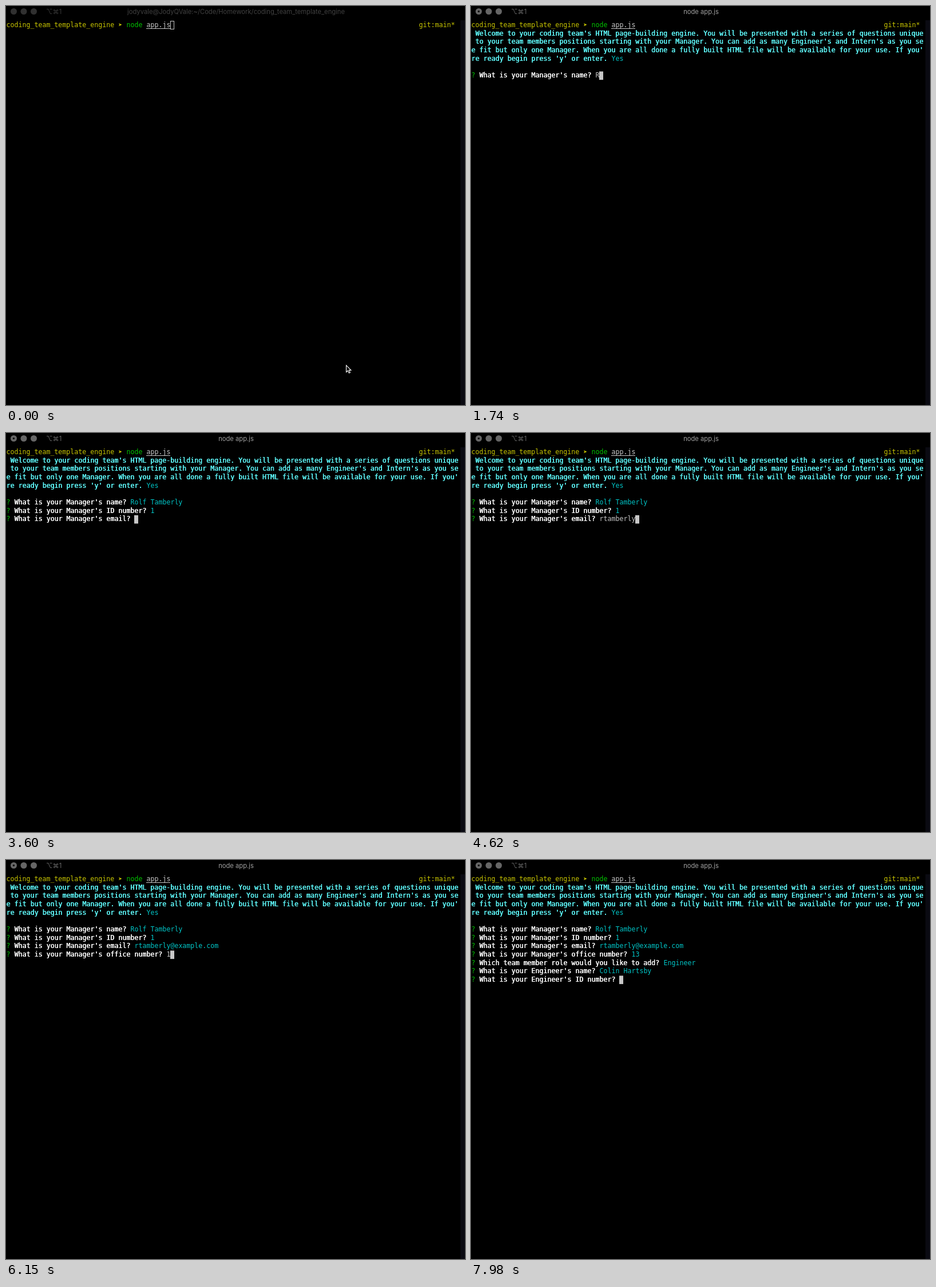
Write an HTML page with a canvas that moves like this. It is 802 px wide and 698 px high and loops after 8000 ms.

```html
<!DOCTYPE html>
<html lang="en">
<head>
<meta charset="utf-8">
<title>Terminal session</title>
<style>
  html, body { margin: 0; width: 100%; height: 100%; overflow: hidden; background: #000; }
  canvas { display: block; }
</style>
</head>
<body>
<canvas id="stage" width="802" height="698"></canvas>
<script>
const ctx = document.getElementById('stage').getContext('2d');
const LOOP = 8000, CELL = 7, LINE = 14.65, TOP = 26.6;
const MONO = '11.627px "DejaVu Sans Mono", monospace';
const SANS = '11.2px Inter, sans-serif';
const C = {
  green: '#00c200', yellow: '#c7c400', cyan: '#00c5c7', sky: '#60fdff',
  gray: '#c7c7c7', dim: '#686868', white: '#ffffff'
};

// Session events in ms
const FOCUS = 300, RUN = 600, WELCOME = 850, CONFIRM = 1350;

const INTRO = [
  " Welcome to your coding team's HTML page-building engine. You will be presented with a series of questions unique",
  " to your team members positions starting with your Manager. You can add as many Engineer's and Intern's as you se",
  "e fit but only one Manager. When you are all done a fully built HTML file will be available for your use. If you'",
  "re ready begin press 'y' or enter. "
];

// ask: question appears, type: first key, rate: ms per key, done: enter pressed
const QUESTIONS = [
  { text: "What is your Manager's name?", answer: 'Rolf Tamberly', ask: CONFIRM, type: 1710, rate: 108, done: 3100 },
  { text: "What is your Manager's ID number?", answer: '1', ask: 3100, type: 3210, rate: 100, done: 3330 },
  { text: "What is your Manager's email?", answer: 'rtamberly@example.com', ask: 3330, type: 3800, rate: 95, done: 5800 },
  { text: "What is your Manager's office number?", answer: '13', ask: 5800, type: 6060, rate: 130, done: 6360 },
  { text: 'Which team member role would you like to add?', answer: 'Engineer', ask: 6360, done: 6780,
    choices: ['Engineer', 'Intern', 'None'] },
  { text: "What is your Engineer's name?", answer: 'Colin Hartsby', ask: 6780, type: 6870, rate: 70, done: 7860 },
  { text: "What is your Engineer's ID number?", answer: '', ask: 7860, type: LOOP, rate: 100, done: LOOP }
];

const rowTop = row => TOP + row * LINE;

// Bold is the regular face struck twice, half a pixel apart
function put(text, col, row, color, bold) {
  const x = col * CELL + 0.5, y = Math.round(rowTop(row) + 10.4);
  ctx.font = MONO;
  ctx.textAlign = 'left';
  ctx.fillStyle = color;
  ctx.fillText(text, x, y);
  if (bold) ctx.fillText(text, x + 0.5, y);
}

function block(col, row) {
  ctx.fillStyle = C.gray;
  ctx.fillRect(col * CELL, rowTop(row), CELL, LINE);
}

function drawTitleBar(t) {
  const active = t >= FOCUS;
  ctx.fillStyle = active ? '#666' : '#303030';
  for (const x of [13.5, 31, 48.5]) {
    ctx.beginPath();
    ctx.arc(x, 9.5, 5.5, 0, Math.PI * 2);
    ctx.fill();
  }
  if (active) {
    ctx.fillStyle = '#111';
    ctx.beginPath();
    ctx.arc(13.5, 9.5, 1.7, 0, Math.PI * 2);
    ctx.fill();
  }
  ctx.font = SANS;
  ctx.fillStyle = active ? '#686868' : '#383838';
  ctx.textAlign = 'left';
  ctx.fillText('⌥⌘1', 70, 13.5);
  ctx.fillStyle = active ? '#a0a0a0' : '#404040';
  ctx.textAlign = 'center';
  ctx.fillText(t >= RUN ? 'node app.js'
    : 'jodyvale@JodyQVale:~/Code/Homework/coding_team_template_engine', 402, 13.5);
}

function drawPrompt(t) {
  put('coding_team_template_engine ➤', 0, 0, C.yellow);
  put('node', 30, 0, C.green);
  put('app.js', 35, 0, C.gray);
  ctx.fillRect(35 * CELL, 39, 6 * CELL, 1);
  put('git:main*', 103, 0, C.yellow);
  if (t < FOCUS) {
    ctx.strokeStyle = C.gray;
    ctx.lineWidth = 1;
    ctx.strokeRect(41 * CELL + 0.5, 26.5, 6, 14);
  } else if (t < RUN) {
    block(41, 0);
  } else if (t < WELCOME) {
    block(0, 1);
  }
}

function drawIntro(t) {
  if (t < WELCOME) return;
  INTRO.forEach((line, i) => put(line, 0, i + 1, C.sky, true));
  if (t < CONFIRM) {
    put('(Y/n)', 35, 4, C.dim);
    block(41, 4);
  } else {
    put('Yes', 35, 4, C.cyan);
  }
}

function drawQuestion(q, row, t) {
  if (t < q.ask) return;
  const col = q.text.length + 3;
  put('?', 0, row, C.green);
  put(q.text, 2, row, C.white, true);
  if (t >= q.done) {
    put(q.answer, col, row, C.cyan);
  } else if (q.choices) {
    put('(Use arrow keys)', col, row, C.gray);
    q.choices.forEach((name, i) =>
      put((i ? '  ' : '❯ ') + name, 0, row + 1 + i, i ? C.gray : C.cyan));
  } else {
    const keys = Math.max(0, Math.floor((t - q.type) / q.rate) + 1);
    const typed = q.answer.slice(0, keys);
    put(typed, col, row, C.gray);
    block(col + typed.length, row);
  }
}

function drawPointer() {
  const points = [[0, 0], [0, 12], [2.8, 9.4], [4.8, 13.6], [6.8, 12.7], [4.9, 8.6], [8.4, 8.6]];
  ctx.beginPath();
  for (const [x, y] of points) ctx.lineTo(594.5 + x, 628.5 + y);
  ctx.closePath();
  ctx.fillStyle = '#000';
  ctx.fill();
  ctx.strokeStyle = '#fff';
  ctx.lineWidth = 1.1;
  ctx.stroke();
}

function draw(now) {
  const t = now % LOOP;
  ctx.fillStyle = '#000';
  ctx.fillRect(0, 0, 802, 698);
  ctx.fillStyle = '#0a0a12';
  ctx.fillRect(794, 25, 8, 673);
  drawTitleBar(t);
  drawPrompt(t);
  drawIntro(t);
  QUESTIONS.forEach((q, i) => drawQuestion(q, i + 6, t));
  if (t < RUN) drawPointer();
}

const start = performance.now();
function tick() {
  draw(performance.now() - start);
  requestAnimationFrame(tick);
}
tick();
</script>
</body>
</html>
```
